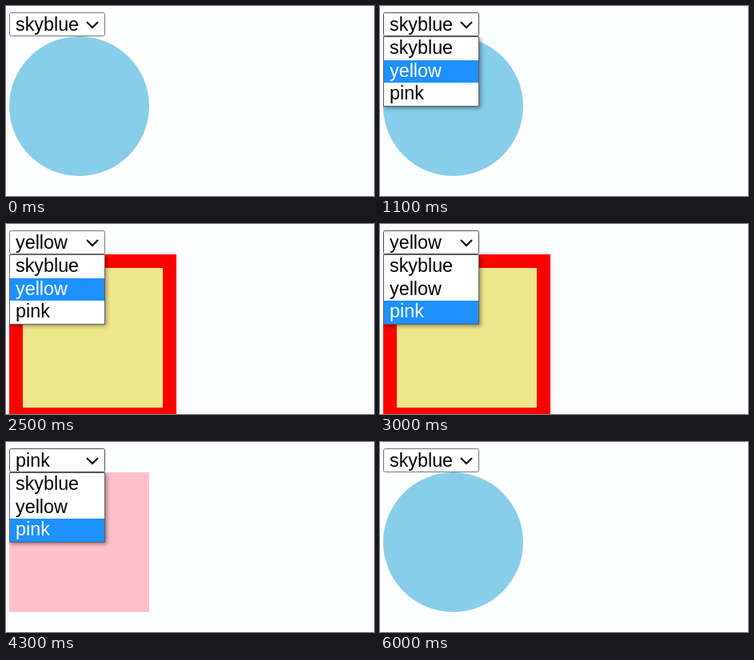
These frames come from a looping animation (460 by 238 pixels, 6100 ms). An HTML page:

```html
<!DOCTYPE html>
<html lang="en">
<head>
<meta charset="utf-8">
<title>Shape picker</title>
<style>
  html, body { margin: 0; width: 100%; height: 100%; overflow: hidden; background: #fcfdff; }
  svg { display: block; }
  text { font: 23.333px "Liberation Sans", Arial, sans-serif; }
</style>
</head>
<body>
<svg id="stage" width="460" height="238" viewBox="0 0 460 238">
  <defs>
    <filter id="blur" x="-20%" y="-20%" width="140%" height="140%">
      <feGaussianBlur stdDeviation="2.5"/>
    </filter>
  </defs>
  <circle id="skyblue" cx="91.5" cy="125.5" r="87.5" fill="skyblue"/>
  <g id="yellow">
    <rect x="4" y="38" width="209" height="209" fill="red"/>
    <rect x="21" y="55" width="175" height="175" fill="khaki"/>
  </g>
  <rect id="pink" x="4" y="38" width="175" height="175" fill="pink"/>

  <rect id="halo" x="2" y="6" width="124" height="35" rx="5" fill="#fff"/>
  <rect id="box" fill="#fff"/>
  <text id="label" x="12" y="31"></text>
  <path d="M101 20 L108 27 L115 20" fill="none" stroke="#000" stroke-width="2.1"/>

  <g id="popup">
    <rect id="shadow" x="6" y="40" width="120" height="88" filter="url(#blur)"/>
    <rect x="4.5" y="38.5" width="119" height="87" fill="#fff" stroke="#606060"/>
    <rect id="highlight" x="5" width="118" fill="#1e90ff"/>
    <text x="12" y="60">skyblue</text>
    <text x="12" y="89">yellow</text>
    <text x="12" y="117">pink</text>
  </g>
</svg>
<script>
const LOOP = 6100;
const names = ['skyblue', 'yellow', 'pink'];
const rowEdges = [39, 68, 96, 125];
const el = id => document.getElementById(id);
const options = document.querySelectorAll('#popup text');

// Each state holds until the next; row is the highlighted option while open.
const states = [
  { at: 0, value: 0, border: '#767676' },
  { at: 400, value: 0, border: '#4f4f4f' },
  { at: 600, value: 0, row: 0, fade: [0.6, 1] },
  { at: 1100, value: 0, row: 1 },
  { at: 1400, value: 1, focus: true },
  { at: 2500, value: 1, row: 1, border: '#767676', fade: [0.85, 0.9, 0.95, 1] },
  { at: 3000, value: 1, row: 2 },
  { at: 3300, value: 2, focus: true },
  { at: 4300, value: 2, row: 2 },
  { at: 4500, value: 2, row: 0 },
  { at: 4900, value: 0, focus: true },
  { at: 6000, value: 0, border: '#767676' }
];

function set(node, attrs) {
  for (const key in attrs) node.setAttribute(key, attrs[key]);
}

function show(id, visible) {
  el(id).style.display = visible ? '' : 'none';
}

function drawSelect({ value, focus, border = '#4f4f4f' }) {
  el('label').textContent = names[value];
  show('halo', focus);
  set(el('box'), focus
    ? { x: 4.5, y: 8.5, width: 119, height: 29, rx: 4, stroke: '#101010', 'stroke-width': 3 }
    : { x: 4.5, y: 8.5, width: 119, height: 29, rx: 2, stroke: border, 'stroke-width': 1 });
}

function drawPopup({ at, row, fade = [1] }, time) {
  const open = row !== undefined;
  show('popup', open);
  if (!open) return;
  const step = Math.min(fade.length - 1, Math.floor((time - at) / 100));
  el('popup').style.opacity = fade.length === 2 ? fade[step] : 1;
  set(el('shadow'), { opacity: 0.4 * fade[step] });
  set(el('highlight'), { y: rowEdges[row], height: rowEdges[row + 1] - rowEdges[row] });
  options.forEach((option, i) => set(option, { fill: i === row ? '#fff' : '#000' }));
}

function render(time) {
  const state = states.findLast(s => s.at <= time);
  names.forEach((name, i) => show(name, i === state.value));
  drawSelect(state);
  drawPopup(state, time);
}

const start = performance.now();
function tick() {
  render((performance.now() - start) % LOOP);
  requestAnimationFrame(tick);
}
tick();
</script>
</body>
</html>
```
